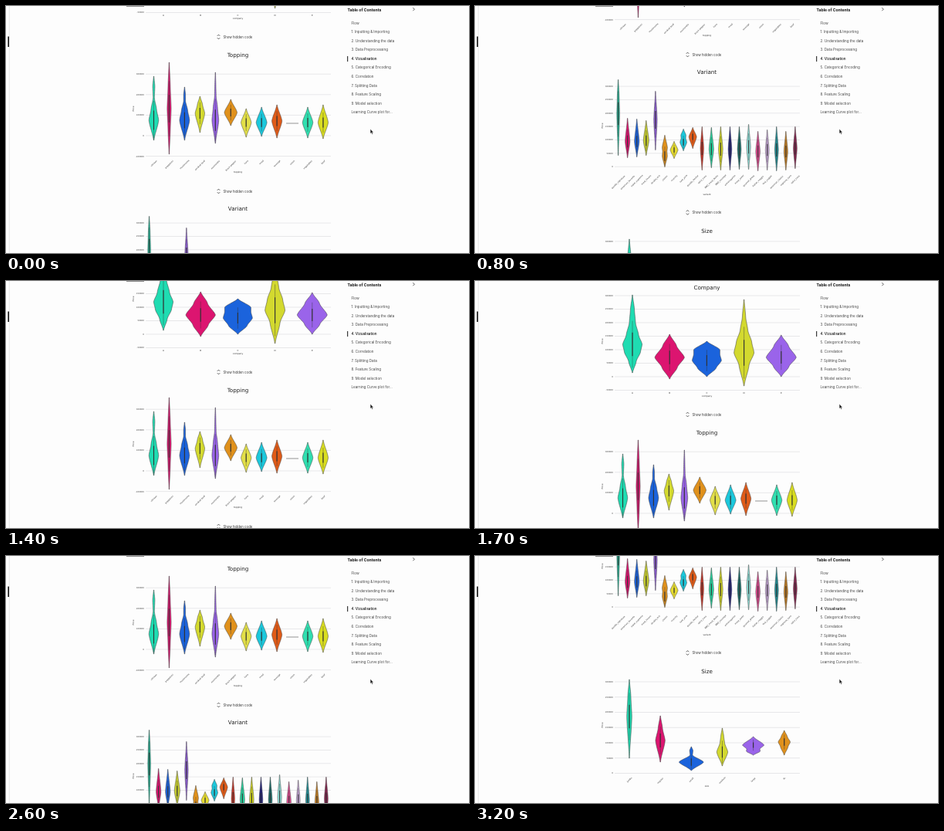
Animation of 600 by 320 pixels, one loop 3300 ms. Source, as an HTML page:

```html
<!DOCTYPE html>
<html>
<head>
<meta charset="utf-8">
<style>
html, body { margin: 0; width: 100%; height: 100%; overflow: hidden; background: #fdfdfd; }
svg { display: block; font-family: "DejaVu Sans", sans-serif; }
.ui { font-family: Inter, sans-serif; }
.violin { stroke: #444; stroke-width: .55; stroke-linejoin: round; }
.grid { stroke: #d9d9dc; stroke-width: .6; }
.icon { fill: none; stroke: #333; stroke-width: .8; }
</style>
</head>
<body>
<svg id="stage" width="600" height="320" viewBox="0 0 600 320">
  <g id="page"></g>
  <path id="edge" d="M156 0H179" stroke="#444" stroke-width="1.2"/>
  <path d="M4.3 0V320" stroke="#e2e2e4" stroke-width=".8"/>
  <path d="M3.2 39.5V53" stroke="#111" stroke-width="1.6"/>
  <g id="toc"></g>
  <path class="icon" d="M527.4 2.2L529.4 4.2L527.4 6.2"/>
  <path d="M472.2 159.6V165.2L473.5 164L474.5 166.2L475.4 165.8L474.4 163.7H476.1Z" fill="#111" stroke="#fff" stroke-width=".3"/>
</svg>
<script>
const teal = '#1fdcb2', crimson = '#dc1570', blue = '#1b63dc', lime = '#d3d92f',
  purple = '#9a64ea', orange = '#e0911c', yellow = '#e2df48', cyan = '#1cc8dc', rust = '#e05b18';

// Each violin: colour, top, widest y, half width, bottom, then further y, half width pairs.
// All y values share the chart's frame, where the title sits at `ref`.
const charts = [
  { title: 'Company', axis: 'company', at: 0, ref: 16, x: 204, dx: 48.2, code: 165,
    zero: 132, gap: 17.5, step: 50000, low: -1, high: 6, labelY: 153, axisY: 157,
    labels: 'A B C D E',
    violins: [
      [teal, 26, 90, 12.6, 127, 45, 2.6, 62, 4, 78, 8, 100, 10.5, 112, 5],
      [crimson, 77, 107, 19.2, 135, 92, 9, 120, 10],
      [blue, 86, 111, 19, 132, 97, 17, 103, 17, 121, 12],
      [lime, 32, 101, 13, 144, 55, 2.2, 72, 5, 87, 10, 117, 6.5],
      [purple, 78, 107, 19.5, 132, 92, 9.5, 119, 10]
    ] },
  { title: 'Topping', axis: 'topping', at: 188, ref: 63, x: 191.5, dx: 19.95, code: 177,
    zero: 168, gap: 26.6, step: 100000, low: -1, high: 3, labelY: 200, axisY: 215, tilt: true,
    labels: 'chicken pepperoni mushrooms smoked_beef mozzarella black_pepper tuna meat sausage onion vegetables beef',
    violins: [
      [teal, 91, 148, 6.3, 174, 104, 1.4, 119, .8, 134, 3.6],
      [crimson, 73, 133, 2.6, 192, 105, 1.5, 160, 1.5],
      [blue, 105, 148, 6.5, 174, 115, 1.2, 123, 1.2, 135, 4],
      [lime, 117, 139, 6.2, 164, 128, 3.4],
      [purple, 86, 148, 4.4, 178, 104, .7, 117, 1, 131, 2.8],
      [orange, 121, 138, 8.3, 155],
      [yellow, 133, 151, 6.7, 170],
      [cyan, 131, 151, 7, 169],
      [rust, 128, 149, 6.6, 171],
      [],
      ['#30dfb0', 131, 151, 6.8, 171],
      ['#d9dd20', 128, 151, 6.6, 172]
    ] },
  { title: 'Variant', axis: 'variant', at: 387, ref: 102.5, x: 185.6, dx: 12.07, code: 182.5,
    zero: 225.7, gap: 17.35, step: 50000, low: 0, high: 6, labelY: 236.5, axisY: 261.5, tilt: true,
    labels: 'double_signature american_favorite super_supreme meat_lovers double_mix classic crunchy new_york double_decker spicy_tuna BBQ_meat_fiesta BBQ_sausage extravaganza meat_eater gournet_greek italian_veggie thai_veggie american_classic neptune_tuna spicy_tuna',
    violins: [
      ['#1dc6a2', 113, 157, 1.8, 211, 134, 1.2],
      [crimson, 163, 193, 3.1, 214],
      [blue, 164, 193, 3.1, 213],
      ['#c6cd30', 166, 192, 3.6, 211],
      [purple, 128, 165, 2.2, 204],
      [orange, 185, 212, 3.3, 226, 201, 3.4, 206, 2.8],
      ['#e6dc30', 193, 204, 5, 215],
      [cyan, 177, 194, 4.4, 205, 185, 3.3, 189, 3],
      [rust, 175, 187, 5, 202],
      ['#e03424', 174, 202, 2.2, 230],
      ['#28d8a2', 175, 203, 3, 227],
      ['#d8dc20', 174, 203, 2.8, 230],
      ['#1c1c82', 174, 203, 2.3, 230],
      ['#18706c', 174, 203, 2.4, 229],
      ['#92e8e0', 171, 200, 2.6, 229],
      ['#e04a90', 180, 206, 2.8, 231],
      ['#d0b0e2', 178, 204, 2.4, 230],
      ['#2098a0', 174, 204, 2.4, 231],
      ['#cf8420', 180, 206, 2.5, 230],
      ['#8e2452', 174, 202, 2.4, 228]
    ] },
  { title: 'Size', axis: 'size', at: 593, ref: 149, x: 200, dx: 40.15, code: 174,
    zero: 281.5, gap: 19.75, step: 50000, low: 0, high: 6, labelY: 287, axisY: 298, tilt: true,
    labels: 'jumbo reguler small medium large XL',
    violins: [
      [teal, 160, 208, 3.3, 262, 182, 2],
      [crimson, 207, 239, 6.2, 267, 223, 2.8],
      [blue, 247, 267, 16, 278, 252, 2.2, 258, 1.6],
      [lime, 223, 254, 7.2, 272, 234, 2, 242, 3],
      [purple, 234, 245, 14, 258, 250, 8.5, 253, 9],
      [orange, 226, 241, 7.8, 258, 234, 4, 247, 5]
    ] }
];

const text = (x, y, size, s, more = '') =>
  `<text x="${x}" y="${y}" dy=".36em" font-size="${size}" ${more}>${s}</text>`;
const middle = 'text-anchor="middle" fill="#333"';

// Half width between outline points, part linear and part eased.
function widthAt(points, y) {
  const i = Math.max(1, points.findIndex(p => p[0] >= y));
  const [y0, w0] = points[i - 1], [y1, w1] = points[i];
  const u = (y - y0) / (y1 - y0), ease = u * u * (3 - 2 * u);
  return w0 + (w1 - w0) * (u + ease) / 2;
}

function violin(x, [color, top, peak, w, bottom, ...extra]) {
  if (!color) return `<path d="M${x - 8} 152H${x + 8}" stroke="#666" stroke-width=".7"/>`;
  const points = [[top, .2], [peak, w], [bottom, .2]];
  for (let i = 0; i < extra.length; i += 2) points.push([extra[i], extra[i + 1]]);
  points.sort((a, b) => a[0] - b[0]);
  const left = [], right = [], n = 60, len = bottom - top;
  for (let i = 0; i <= n; i++) {
    const y = top + len * i / n, half = widthAt(points, y);
    left.push(`${(x - half).toFixed(2)} ${y.toFixed(2)}`);
    right.unshift(`${(x + half).toFixed(2)} ${y.toFixed(2)}`);
  }
  const bar = (k, width) =>
    `<path d="M${x} ${peak - len * k}V${peak + len * k}" stroke="#333" stroke-width="${width}"/>`;
  return `<path class="violin" fill="${color}" d="M${left.concat(right).join('L')}Z"/>` +
    bar(.3, .4) + bar(.15, 1.1);
}

function hiddenCode(y) {
  return `<path class="icon" d="M273.8 ${y - 1.2}L275.5 ${y - 2.9}L277.2 ${y - 1.2}M273.8 ${y + 1.2}L275.5 ${y + 2.9}L277.2 ${y + 1.2}"/>` +
    text(281.5, y, 4.3, 'Show hidden code', 'class="ui" fill="#333"');
}

function chart(c) {
  let out = text(300.5, c.ref, 7.15, c.title, 'text-anchor="middle" fill="#222"');
  for (let k = c.low; k <= c.high; k++) {
    const y = c.zero - k * c.gap;
    out += `<path class="grid" d="M181 ${y}H421"/>` +
      text(179, y, 2.7, k * c.step, 'text-anchor="end" fill="#444"');
  }
  out += text(165, c.ref + 70, 2.9, 'Price', `${middle} transform="rotate(-90 165 ${c.ref + 70})"`);
  c.labels.split(' ').forEach((label, i) => {
    const x = c.x + i * c.dx;
    const y = c.labelY + (c.tilt ? label.length * .57 : 0);
    const name = c.title == 'Topping' ? label.replace('_', ' ') : label;
    out += violin(x, c.violins[i]) +
      text(x, y, 2.75, name, middle + (c.tilt ? ` transform="rotate(-45 ${x} ${y})"` : ''));
  });
  out += text(300.5, c.axisY, 2.9, c.axis, middle) + hiddenCode(c.ref + c.code);
  return `<g transform="translate(0 ${c.at - c.ref})">${out}</g>`;
}

const page = document.getElementById('page'), edge = document.getElementById('edge');
page.innerHTML = hiddenCode(-22) + charts.map(chart).join('');

const entries = ['Flow', '1. Inputting &amp; Importing', '2. Understanding the data', '3. Data Preprocessing',
  '4. Vizualisation', '5. Categorical Encoding', '6. Correlation', '7. Splitting Data',
  '8. Feature Scaling', '9. Model selection', 'Learning Curve plot for...'];
document.getElementById('toc').innerHTML =
  text(442.5, 5, 5.1, 'Table of Contents', 'class="ui" font-weight="700" fill="#111"') +
  '<path d="M442.7 65V72" stroke="#111" stroke-width="1"/>' +
  entries.map((s, i) => text(447.5, 22 + i * 11.56, 4.55, s,
    `class="ui" fill="${i == 4 ? '#111' : '#444'}" ${i == 4 ? 'font-weight="500"' : ''}`)).join('');

// Scroll positions: tick of 100 ms, y of the first title.
const keys = [[0, -125], [4, -285], [6, -340], [8, -302], [14, -47], [18, 16], [22, 16], [26, -172], [32, -444]];

function slope(i) {
  const a = keys[Math.max(0, i - 1)], b = keys[Math.min(keys.length - 1, i + 1)];
  return (b[1] - a[1]) / (b[0] - a[0]);
}

function scrollAt(tick) {
  const i = Math.max(1, keys.findIndex(k => k[0] >= tick));
  const [t0, y0] = keys[i - 1], [t1, y1] = keys[i], d = t1 - t0;
  const u = (tick - t0) / d, v = 1 - u;
  return y0 * (1 + 2 * u) * v * v + y1 * u * u * (3 - 2 * u) +
    d * u * v * (slope(i - 1) * v - slope(i) * u);
}

function draw() {
  const tick = Math.floor(performance.now() % 3300 / 100);
  const y = Math.round(scrollAt(tick));
  page.setAttribute('transform', `translate(0 ${y})`);
  edge.style.display = y < 0 ? '' : 'none';
  requestAnimationFrame(draw);
}
draw();
</script>
</body>
</html>
```
